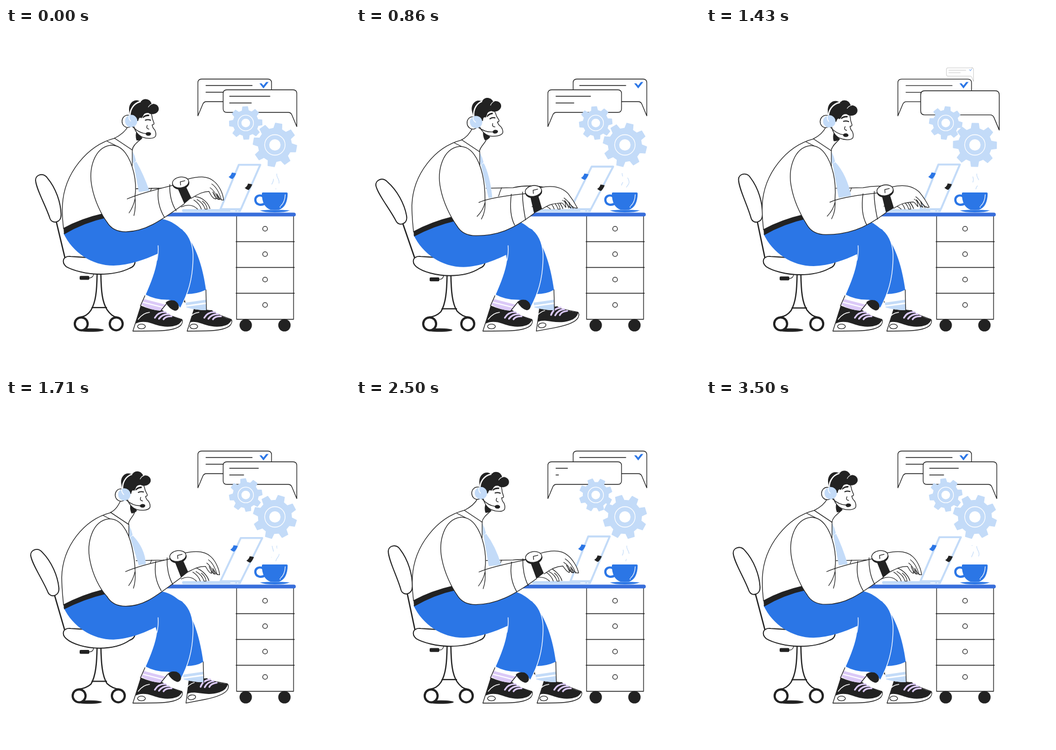
These frames come from a looping animation (640x640 px, 3570 ms). An HTML page with a canvas:

```html
<!DOCTYPE html>
<html lang="en">
<head>
<meta charset="utf-8">
<title>Support desk</title>
<style>
html, body { margin: 0; width: 100%; height: 100%; overflow: hidden; background: #fff; }
canvas { display: block; width: 100vw; height: 100vh; object-fit: contain; }
</style>
</head>
<body>
<canvas id="stage"></canvas>
<script>
const canvas = document.getElementById('stage');
const ctx = canvas.getContext('2d');
const ratio = window.devicePixelRatio || 1;
canvas.width = canvas.height = 640 * ratio;

const LOOP = 3570, STEP = LOOP / 50, SWAY = LOOP / 3, TURN = LOOP / 4;
const BLUE = '#2b76e6', DESK = '#386edb', PALE = '#c3dbf8';
const INK = '#222', LILAC = '#dbc9f7', WHITE = '#fff';
const TAU = Math.PI * 2, RAD = Math.PI / 180;

const lerp = (a, b, k) => a + (b - a) * k;
const clamp = v => Math.max(0, Math.min(1, v));
const smooth = (a, b, v) => { const k = clamp((v - a) / (b - a)); return k * k * (3 - 2 * k); };

// Piecewise linear curve through [time, value] pairs.
function track(keys, t) {
  if (t <= keys[0][0]) return keys[0][1];
  for (let i = 1; i < keys.length; i++) {
    const [t0, v0] = keys[i - 1], [t1, v1] = keys[i];
    if (t <= t1) return lerp(v0, v1, (t - t0) / (t1 - t0));
  }
  return keys[keys.length - 1][1];
}

function fill(d, color = WHITE) {
  ctx.fillStyle = color;
  ctx.fill(new Path2D(d));
}
function line(d, width = 1.3, color = INK) {
  ctx.strokeStyle = color;
  ctx.lineWidth = width;
  ctx.stroke(new Path2D(d));
}
function shape(d, color = WHITE, width = 1.3, edge = INK) {
  fill(d, color);
  line(d, width, edge);
}
function oval(x, y, rx, ry, color, width = 0, edge = INK, turn = 0) {
  ctx.beginPath();
  ctx.ellipse(x, y, rx, ry, turn, 0, TAU);
  if (color) { ctx.fillStyle = color; ctx.fill(); }
  if (width) { ctx.strokeStyle = edge; ctx.lineWidth = width; ctx.stroke(); }
}
function group(draw) {
  ctx.save();
  draw();
  ctx.restore();
}
function spin(x, y, deg, k = 1) {
  ctx.translate(x, y);
  ctx.rotate(deg * RAD);
  ctx.scale(k, k);
  ctx.translate(-x, -y);
}

// Chat bubbles

const RISE = [[0, 150], [70, 155.5], [177, 159.5], [322, 153], [430, 149], [892, 149],
  [962, 141.8], [1070, 133.7], [1215, 129], [1785, 129], [1855, 122.5], [1962, 100], [2107, 86.5], [2200, 84]];
const GROW = [[0, 0.45], [70, 0.79], [177, 1.127], [322, 1.066], [430, 1], [1785, 1],
  [1855, 1.04], [1962, 0.63], [2107, 0.365], [2200, 0.2]];
const FADE = [[0, 0], [70, 0.95], [110, 1], [1855, 1], [1962, 0.85], [2107, 0.5], [2200, 0]];
const TICK = [[930, 0], [962, 0.45], [1070, 0.65], [1215, 1]];
const BUBBLE = 'M7 0H130Q137 0 137 7V35Q137 42 130 42H16Q11 42 9 47L0 68.5V7Q0 0 7 0Z';

function bubble(age, left) {
  const k = track(GROW, age), x = left ? 15 : 12;
  ctx.globalAlpha = track(FADE, age);
  ctx.translate(left ? 425.5 : 472.5, track(RISE, age));
  ctx.scale(k, k);
  ctx.translate(-68.5, -34);
  group(() => {
    if (!left) { ctx.translate(137, 0); ctx.scale(-1, 1); }
    shape(BUBBLE);
  });
  const first = 86 * clamp((age - 427) / 287), second = 58 * clamp((age - 475) / 290);
  if (first) line(`M${x} 12h${first}`);
  if (second) line(`M${x} 24.5h${second}`);
  const tick = track(TICK, age);
  if (tick) {
    ctx.translate(left ? 123 : 122, 11);
    ctx.scale(tick, tick);
    fill('M-8.5 -3H-4.5L-1 1L4 -5.5H8.5L-1 6.5Z', BLUE);
  }
}

function chat(t) {
  for (let i = -3; i < 4; i++) {
    const age = t - 215 - i * TURN;
    if (age >= 0 && age < 2200) group(() => bubble(age, i % 2 === 0));
  }
}

function gear(x, y, r, root, ring, hole, deg) {
  ctx.beginPath();
  for (let i = 0; i < 8; i++) {
    for (const [a, q] of [[-14, root], [-8.5, r], [8.5, r], [14, root]]) {
      const w = (i * 45 + a + deg - 90) * RAD;
      ctx.lineTo(x + q * Math.cos(w), y + q * Math.sin(w));
    }
  }
  ctx.closePath();
  ctx.fillStyle = ctx.strokeStyle = PALE;
  ctx.lineWidth = 1.6;
  ctx.fill();
  ctx.stroke();
  oval(x, y, ring, ring, null, 1.3, WHITE);
  oval(x, y, hole, hole, WHITE);
}

// Furniture

function desk() {
  shape('M429 349H535V542H429Z');
  line('M428 397.5H536.5M428 445.5H536.5M428 493.5H536.5');
  line('M300 347H535.5', 7.2, DESK);
  for (const y of [373.5, 420.8, 468, 515.3]) oval(482, y, 4.4, 4.4, WHITE, 1.3);
  for (const x of [446, 518]) oval(x, 553, 11.5, 11.5, INK);
}

function steam(d, on, gap, top) {
  group(() => {
    ctx.lineCap = 'butt';
    ctx.setLineDash([on, gap]);
    ctx.lineDashOffset = -top;
    line(d, 1.1, PALE);
  });
}

function cup(p) {
  steam('M495 270C495 276 499 280 497 285C496 289 494 290 494 293', 11, 11, 11 - 22 * p);
  steam('M504 271C502 277 509 281 508 288C507 293 502 295 502 300', 20, 11, 30 - 31 * p);
  line('M478 313C470 309 463 314 464 321C465 328 473 331 481 327', 4.2, BLUE);
  fill('M476 308Q476 306 478 306H522Q524 306 524 308C524 324 518 335 508 338H492C482 335 476 324 476 308Z', BLUE);
  line('M519.5 310C519 320 516 327 511 331', 1.2, WHITE);
  oval(510, 333, 0.9, 0.9, WHITE);
  fill('M472.5 339.5Q500 337 528 339.5Q520 343 500 343Q480 343 472.5 339.5Z', BLUE);
}

function laptop(tilt) {
  const x = 435.5 - 3.5 * tilt, y = 256 - 2.2 * tilt;
  shape(`M${x} ${y}H${x + 40}L437 337H399Z`, WHITE, 3.6, PALE);
  const tag = (dx, dy, color) => group(() => {
    ctx.translate(dx + (x - 433.5) * 0.85, dy + (y - 254.5) * 0.5);
    fill('M-1 -6Q3 -6 7 -4.5Q4 3 0 6Q-4 5 -7 2Q-2 -1 -1 -6Z', color);
  });
  tag(421.5, 275, BLUE);
  tag(451.5, 295.5, INK);
  fill('M330 337H435Q437.5 337 437.5 339.7T435 342.5H330Q327.5 342.5 327.5 339.7T330 337Z', PALE);
  line('M418 340.3H426M430.5 340.3H431.5', 1.6, WHITE);
}

function chair(s, c) {
  const lean = c - 0.536, drop = 4 * s, half = 32.5 + 4.3 * s;
  group(() => {
    ctx.translate(0, 2.2 * s);
    spin(110, 428, 3.8 * lean);
    line('M93 358L110 429', 2.4);
    spin(92, 356, 2.4 * lean);
    shape('M55 283C55 273 69 268 77 279C93 298 102 325 102.5 347C103 363 86 365 82 355C74 330 56 300 55 283Z', WHITE, 1.9);
  });
  const L = 172.5 - half, R = 172.5 + half, bar = 520 + drop * 0.9;
  oval(158 - drop, 562, 24, 3.2, INK);
  line(`M169.5 458C169 490 167 ${510 + drop} 158 ${525 + drop}C152 534 145 537 ${L - 1} 538`, 2.3);
  line(`M176.5 458C177 490 179 ${510 + drop} 188 ${524 + drop}C194 533 200 537 ${R + 1} 538`, 2.3);
  line(`M160 ${bar}H187`, 2.2);
  oval(L, 550.4, 12, 12, WHITE, 4);
  oval(R, 550.4, 12, 12, WHITE, 4);
  line(`M155 ${465 + drop}Q163 ${465 + drop} 163 ${456 + drop}`, 1.2);
  line(`M139 ${463.3 + drop}H153V${466.5 + drop}H139Z`, 4);
  shape(`M107 431Q110 424 120 425L240 433Q241 443 230 447C212 ${456 + drop} 190 ${458 + drop} 174 ${458 + drop}C150 ${458 + drop} 124 ${451 + drop} 112 444Q105 438 107 431Z`, WHITE, 1.9);
}

// Person

function shoe(ox, heel) {
  ctx.translate(ox, 0);
  const h = heel;
  shape(`M${251 + h} 517L${236 + h} 564L280 563.5C302 563 320 560 326 552Q330 546 327 542Z`);
  fill(`M${251 + h} 516C260 521 278 525 291 525C300 533 315 539 328 542.5Q324 553 310 555C290 558 278 551 264 547.5Q250 545 ${241 + h} 550Z`, INK);
  line('M246 542Q255 530 267 529', 1.3, WHITE);
  line('M277 539Q283 528 297 528.5M284.5 541Q291 532 303 532.5M293 542Q297 536 308 536.5', 3.2, LILAC);
  oval(252 + h * 0.6, 555.3, 7.3, 4.4, WHITE, 1.3);
}

function legs(s) {
  const x = -5.5 * s, y = 4 * s;
  // far foot
  group(() => {
    ctx.translate(-2.5 * s, 0);
    spin(336, 563, -10 * smooth(0.25, 0.75, s));
    shoe(92, 9);
  });
  group(() => {
    ctx.translate(x, 0);
    fill('M333 494L372 486L373 525Q352 525 335 519Z');
    fill('M334 511L372 505.5V510.5L335 516Z', PALE);
    fill('M335 518.5L373 513.5V525Q354 525 336 520Z', PALE);
    line('M372 487L373 526');
    fill('M325 507L332 503L334 511Z', INK);
  });
  // near foot
  group(() => shoe(0, 0));
  fill('M259 497L250 516Q270 525 288 526L304 506Z');
  fill('M256 504L298 515L289 526Q268 525 252 515Z', LILAC);
  line('M254 510L295 520.5', 2, WHITE);
  line('M258.5 498L250 517M288 526L301 510');
  // trousers
  fill(`M280 ${354 + y * 0.25}C325 ${356 + y * 0.25} ${360 + x} 400 ${372 + x} 487Q355 495 ${336 + x * 0.2} 495L300 440Z`, BLUE);
  fill(`M107 ${382 + y}C124 ${418 + y} 160 ${442 + y} 200 ${442 + y}C230 ${441 + y} 258 ${431 + y * 0.5} ${282 - y} ${420 + y * 0.7}L281 432C279 450 269 476 260 496Q278 506 302 505.5Q318 508 324.5 521C338 495 347 470 348 430C349 405 342 387 329 375.5L300 361L185 ${346 + y}Z`, BLUE);
  line('M329 375.5C342 387 349 405 348 430C347 470 338 495 324.5 521', 1.3, WHITE);
  line('M283 405Q284 418 281 432', 1.3, WHITE);
  group(() => {
    ctx.translate(4.5 * s, -1.5 * s);
    fill('M297 511Q302 505 313 507Q322 511 321.5 520Q320 526 314 526Q304 523 297 511Z', INK);
  });
}

function belt(s) {
  fill(`M107 ${372 + 9 * s}Q140 ${354 + 9 * s} 182 ${344.5 + 8 * s}L187 ${353 + 8 * s}Q145 ${362 + 9 * s} 108 ${384 + 6 * s}Z`, INK);
}

function torso(s) {
  const X = v => v - 8 * s, Y = v => v + 5 * s;
  const back = `M${X(202)} ${Y(205)}C${X(152)} ${Y(218)} ${108 - 3 * s} ${270 + 3 * s} ${105 - 1.5 * s} 330C104 ${350 + 5 * s} 106 ${362 + 7 * s} 107 ${373 + 9 * s}`;
  fill(`${back}L240 ${350 + 8 * s}L244 300L${X(235)} ${Y(227)}Z`);
  line(back);
}

function neck(s, hx, hy) {
  const X = v => v - 8 * s, Y = v => v + 4.5 * s;
  const back = `M${hx - 6} ${hy + 10}C${hx - 11} ${hy + 20} ${X(212)} ${Y(200)} ${X(202)} ${Y(205)}`;
  fill(`${back}L${X(235)} ${Y(227)}C${X(236)} ${Y(218)} ${X(246)} ${Y(211)} ${hx + 19} ${hy + 33}L${hx + 14} ${hy}Z`);
  line(back);
  line(`M${X(202)} ${Y(205)}L${X(235)} ${Y(227)}C${X(236)} ${Y(218)} ${X(245)} ${Y(212)} ${hx + 19} ${hy + 33}`);
  line(`M${X(188)} ${Y(210.5)}L${X(204)} ${Y(218.5)}`, 1.1);
}

function tie(s, c, d) {
  const X = v => v - 7 * s, Y = v => v + 4 * s, end = 260 + 9 * c;
  fill(`M${X(235.5)} ${Y(229)}Q${X(240)} ${Y(238)} ${X(242)} ${Y(247)}L${X(237.5)} ${Y(252)}L${X(236)} ${Y(250)}Z`, PALE);
  fill(`M${X(237.5)} ${Y(252)}L${X(242.5)} ${Y(248.5)}Q${end - 9 + 10 * s} ${272 + 4 * s} ${end + 2} ${303 + 14 * d}L247 ${305 + 14 * d}Z`, PALE);
  line(`M${X(235)} ${Y(227)}V${Y(256)}`, 1.2);
}

function head(hx, hy, deg) {
  ctx.translate(hx, hy);
  ctx.rotate(deg * RAD);
  ctx.translate(-233, -173);
  fill('M243 192L254 205Q249 210 243 209Q240 200 243 192Z', INK);
  const face = 'M270 158Q272 164 272.5 169L275.5 177Q276 180 272 180Q273 186 276.5 189Q280 195 278.5 201C275 207 262 206 254 203C246 200 240 192 238 183';
  fill(face + 'L234 160L250 148Z');
  line(face);
  // hair
  fill('M229 151C229 138 240 131 249 136L252 136C256 130 268 131 271 141C280 140 286 146 284 153C281 161 270 162 265 158Q257 157 255 164L252 168Q248 164 246 173H234L230 163Z', INK);
  line('M231 168C229 152 238 140 250 137', 2.4, WHITE);
  line('M265 147Q268 142 273 141', 1.1, WHITE);
  fill('M254 167.5Q255 162 264 161L267 161.5L266 164Q260 163.5 256 167Z', INK);
  line('M263 181Q260 187 266 188', 1.3);
  line('M259.5 171.5Q264 169.5 269 171.5', 2);
  // headset
  oval(226.5, 173.5, 10.5, 11.5, WHITE, 1.3);
  oval(233, 173, 11.5, 11.5, PALE);
  line('M229 163Q228 169 232 173', 1.5, WHITE);
  line('M236 184C243 191 251 196 261 196.5', 1.3);
  oval(265, 197, 5, 3.4, INK);
}

function farArm(d, e) {
  const u = 1 - d, x = e * 0.5 + 3 * d;
  const top = `M242 ${299 - d}L292 ${298 - d}C310 ${293 + 4 * u} 338 ${291 + 7 * u} ${352 + x} ${lerp(298, 314, u)}`;
  const tips = `C${366 + x} ${lerp(318, 315, u)} ${376 + x} 326 ${379 + x} 336`;
  fill(`${top}${tips}L${356 + x} 337Q345 328 326 333L270 312Z`);
  line(top + tips);
  line(`M271 ${298 - d}Q267 306 265 314`, 1.1);
  line(`M${355 + x} 319Q${367 + x} 326 ${370 + x} 337H${374 + x}Q${373 + x} 328 ${365 + x} 322M${349 + x} 320Q${360 + x} 327 ${363 + x} 337M326 333Q${344 + x} 325 ${356 + x} 337`, 1.1);
}

function nearArm(s, d, wx, wy, lift) {
  const X = v => v - 4 * s, Y = v => v + 3.5 * s;
  const ey = 379 + 4 * s + 5 * d, m = (a, b) => lerp(a, b, d);
  const tx = 225 + (wx - 324) * 0.6, ty = 318 + 7 * d;
  const wrist = `${wx + m(7, 1)} ${wy + m(39, 41)}`;
  const outer = `M${X(195)} ${Y(218)}C${X(164)} ${Y(222)} ${X(153)} ${Y(262)} ${X(160)} ${Y(296)}C${X(165)} ${Y(322)} ${X(178)} ${Y(348)} 188 ${ey - 18}C195 ${ey - 6} 207 ${ey} 223 ${ey}C${m(258, 262)} ${ey} ${wx - 39} ${wy + 72} ${wrist}`;
  const inner = `M${X(195)} ${Y(218)}C${X(217)} ${Y(217)} ${X(231)} ${Y(240)} ${X(238)} ${Y(270)}Q${X(243)} ${Y(292)} 240 ${ty - 5}`;
  const upper = `M${tx} ${ty}C${tx + 20} ${ty - 9} ${wx - 45} ${wy + m(12, 7)} ${wx - 12} ${wy + 4}`;
  fill(`${outer}L${wx - 12} ${wy + 4}C${wx - 45} ${wy + m(12, 7)} ${tx + 30} ${ty - 12} 241 ${ty - 6}Q${X(243)} ${Y(292)} ${X(238)} ${Y(270)}C${X(231)} ${Y(240)} ${X(217)} ${Y(217)} ${X(195)} ${Y(218)}Z`);
  line(outer);
  line(inner);
  line(upper);
  line(`M240 ${ty - 5}Q242 ${ty + 16} ${m(238, 233)} ${ty + 31}M240 ${ty}Q237 ${ty + 14} ${m(229, 225)} ${ty + 26}`, 1.2);

  ctx.translate(wx, wy);
  line(`M-41 ${m(10, 5)}C-44 28 ${m(-40, -43)} 48 ${m(-30, -35)} ${m(64, 63)}M-20 ${m(3, 1)}C-21 20 -17 39 ${m(-8, -15)} ${m(52, 53)}`);
  // hand
  group(() => {
    spin(15, 10, -4.5 * lift, 1 + 0.045 * lift);
    const back = `M13 -7C${m(32, 36)} -12 ${m(50, 53)} ${m(-14, -8)} ${m(62, 65)} ${m(-3, 5)}C71 ${m(4, 13)} ${m(79, 78)} ${m(19, 24)} ${m(80, 82)} ${m(32, 31)}`;
    const palm = `C${m(73, 75)} 33 ${m(71, 68)} 25 ${m(67, 66)} 20Q${m(71, 67)} 30 ${m(73, 70)} 31C65 31 62 21 ${m(60, 58)} 17Q${m(66, 60)} 26 ${m(66, 60)} 30C60 30 56 22 ${m(53, 52)} ${m(16, 22)}C${m(38, 35)} ${m(16, 23)} 28 25 ${m(19, 16)} ${m(29, 33)}`;
    fill(`${back}${palm}L0 10Z`);
    line(back + palm, 1.2);
    line(`M${m(58, 57)} ${m(2, 13)}Q${m(70, 66)} ${m(10, 20)} ${m(76, 74)} 32M${m(55, 54)} ${m(9, 17)}Q64 ${m(15, 23)} ${m(70, 65)} 31`, 1.1);
  });
  // watch
  fill(`M-6 9L9 ${m(5, 8)}L${m(20, 16)} ${m(28, 33)}L${m(7, 1)} ${m(39, 41)}Z`, INK);
  oval(0.5, 1.5, 15.5, 10.5, INK, 1, INK, -0.15);
  oval(0, -0.8, 15.2, 10, WHITE, 1.3, INK, -0.15);
  line('M0 4L-0.5 -2L8 -4', 1.3);
}

function scene(t) {
  const p = t / SWAY;
  const wave = (shift, n = 1) => Math.cos(TAU * n * (p - shift));
  const s = (1 - wave(0.03)) / 2;    // body settles back
  const c = wave(0.16);              // chair follows late
  const d = (1 - wave(0.01, 2)) / 2; // near hand pressed down
  const lift = Math.sin(2 * TAU * p) * (1 - d);
  const wx = 326.5 - 5 * wave(-0.05, 2) + 2.5 * wave(0.06), wy = 288 + 17 * d;
  const hx = 233 - 14 * s, hy = 173 + 3 * s;

  ctx.setTransform(ratio, 0, 0, ratio, 0, 0);
  ctx.lineCap = ctx.lineJoin = 'round';
  ctx.fillStyle = WHITE;
  ctx.fillRect(0, 0, 640, 640);

  chat(t);
  const turn = 360 * t / LOOP;
  gear(446, 176.7, 30.5, 23.5, 14.5, 8, turn - 2);
  gear(500.3, 217.5, 40.5, 31, 19, 10.5, 10 - turn);
  desk();
  cup(p);
  laptop(wave(0.13));
  chair(s, c);
  torso(s);
  legs(s);
  belt(s);
  neck(s, hx, hy);
  farArm(d, wx - 324);
  tie(s, c, d);
  group(() => head(hx, hy, 7 * (c - 0.536)));
  group(() => nearArm(s, d, wx, wy, lift));
}

const start = performance.now();
function tick(now) {
  const t = Math.max(0, now - start) % LOOP;
  scene(Math.floor((t + 5) / STEP) % 50 * STEP);
  requestAnimationFrame(tick);
}
scene(0);
requestAnimationFrame(tick);
</script>
</body>
</html>
```
